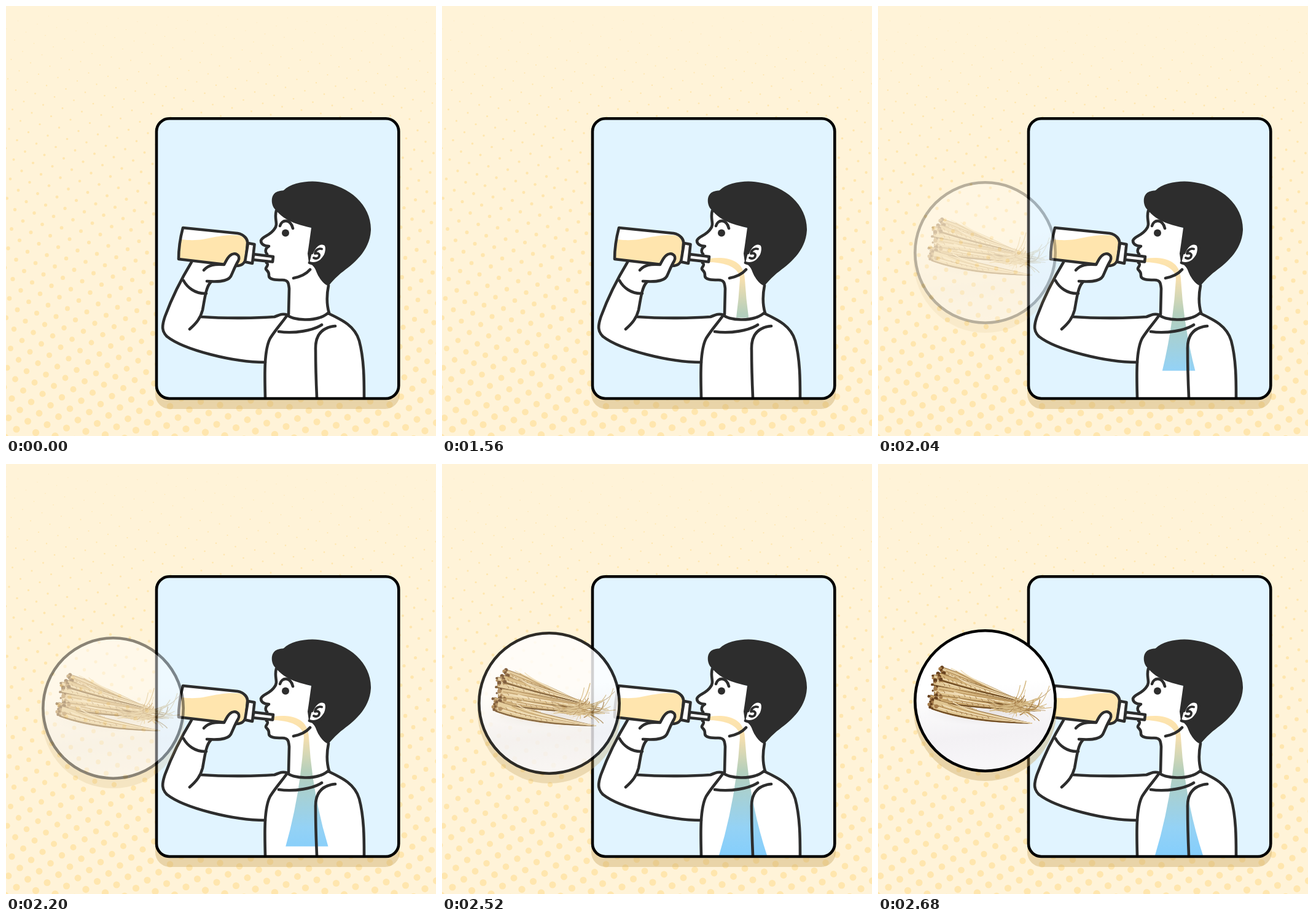
Write an HTML page that moves like this. It is 700 px wide and 700 px high and loops after 3.93 s.

```html
<!DOCTYPE html>
<html lang="en">
<head>
<meta charset="utf-8">
<title>Drink</title>
<style>
  html, body { margin: 0; width: 100%; height: 100%; overflow: hidden; background: #fff3d8; }
  svg { display: block; width: 100%; height: 100%; }
  .line { fill: none; stroke: #2d2d2d; stroke-width: 4.6; stroke-linecap: round; stroke-linejoin: round; }
  .skin { fill: #fff; }
  .ink { fill: #2d2d2d; }
  .rim { fill: none; stroke: #000; stroke-width: 4.6; }
</style>
</head>
<body>
<svg viewBox="0 0 700 700">
  <defs>
    <linearGradient id="flow" gradientUnits="userSpaceOnUse" x1="0" y1="410" x2="0" y2="637">
      <stop offset="0" stop-color="#ffe5ae"/>
      <stop offset=".15" stop-color="#f6dfae"/>
      <stop offset=".4" stop-color="#b4cfbc"/>
      <stop offset=".8" stop-color="#94d2f5"/>
      <stop offset="1" stop-color="#85cefc"/>
    </linearGradient>
    <linearGradient id="paper" x1=".4" y1="0" x2=".5" y2="1">
      <stop offset=".4" stop-color="#fff"/>
      <stop offset=".75" stop-color="#f3f1f4"/>
      <stop offset="1" stop-color="#f8f7f9"/>
    </linearGradient>
    <radialGradient id="shade">
      <stop offset="0" stop-color="#a99a92" stop-opacity=".25"/>
      <stop offset="1" stop-color="#c9c2c4" stop-opacity="0"/>
    </radialGradient>
    <clipPath id="wipe"><rect id="wipeBox" x="430" y="400" width="110" height="0"/></clipPath>
    <clipPath id="lens"><circle cx="174.5" cy="385.5" r="114"/></clipPath>
  </defs>

  <g id="dots" fill="#ffe6ae"></g>

  <rect x="243" y="197" width="398" height="459" rx="24" fill="#c8a55f" fill-opacity=".4"/>
  <rect x="245" y="183.300" width="394.300" height="455.700" rx="21" fill="#e1f4ff"/>

  <!-- body fills -->
  <g class="skin">
    <path d="M302 417C285 445 270 475 259 505C253 522 254 530 262 538C290 560 370 580 422 580L458 503C450 500 445 503 437 506C410 508 360 509 318 506C323 490 322 464 333 450L366 440 375 418Z"/>
    <path d="M440 333C436 348 444 354 437 363C430 374 417 375 415 382C415 388 421 391 428 391C421 395 422 401 425 404V418C429 422 423 424 423 428C424 431 428 431 428 438C427 446 440 446 450 446C460 446 460 452 461 460L459 503 490 520 526 500C523 490 521 475 525 455L530 380Z"/>
    <path d="M422 637C421 600 420 560 430 541C440 525 450 515 458 503C465 511 505 516 524 500C545 510 568 520 575 545C583 575 583 610 583 637Z"/>
  </g>

  <path clip-path="url(#wipe)" fill="url(#flow)" d="M436 411C460 408 492 411 493 445Q499 545 529 637H451Q479 545 485 445C485 430 470 418 436 417Z"/>

  <!-- head -->
  <path class="ink" d="M439 332C431 325 430 308 440 303C446 300 450 301 452 300C465 287 495 283 515 287C560 293 595 325 594 365C592 400 565 420 545 435C536 443 530 449 525 456C515 452 508 440 505 432C503 426 499 421 493 418L491 403C493 390 495 375 497 361C480 357 455 352 439 332Z"/>
  <path class="line" d="M440 333C436 348 444 354 437 363C430 374 417 375 415 382C415 388 421 391 428 391C421 395 422 401 425 404M424 418C429 422 423 424 423 428C424 431 428 431 428 438C427 446 440 446 450 446C460 446 460 452 461 460L460 502M525 455C521 475 523 490 526 500M468 443C478 441 489 436 495 429M446 358C449 347 463 346 467 362"/>
  <circle class="ink" cx="455" cy="369.500" r="6"/>
  <path class="line" style="fill:#fff" d="M498 402C502 391 510 384 518 387C525 390 522 404 517 410C511 419 501 421 494 418"/>
  <path class="line" style="stroke-width:3.800" d="M514 395.500C507 394 503 399 503 403C510 401 512 406 508 410C505 412 503 411 501 410"/>

  <!-- clothes and arm -->
  <path class="line" d="M422 637C421 600 420 560 430 541C440 525 450 515 458 503C465 511 505 516 524 500C545 510 568 520 575 545C583 575 583 610 583 637M444 530C470 534 500 528 514 519M536 521C515 523 503 535 504 560C504 590 505 615 506 637"/>
  <path class="line" d="M302 417C285 445 270 475 259 505C253 522 254 530 262 538C290 560 370 580 422 580M318 506C360 509 410 508 437 506C445 503 450 500 458 503M289 447C295 458 308 469 326 468M333 450C325 458 323 480 320 495C316 510 308 518 299 526"/>

  <!-- bottle and hand -->
  <path class="skin" d="M288 361L377 370C388 372 394 380 393 387L391 410C389 418 385 423 375 423L281 412C281 395 283 380 288 361Z"/>
  <path fill="#ffe5ae" d="M286 380C325 385 335 372 376 373C388 374 393 380 393 387L391 410C389 418 385 423 375 423L281 412C282 400 283 390 286 380Z"/>
  <path class="line" d="M288 361L377 370C388 372 394 380 393 387L391 410C389 418 385 423 375 423L281 412C281 395 283 380 288 361Z"/>
  <path class="line" style="fill:#fff" d="M394 386L404.500 388 401 419 389 416.500ZM403 404L435 408 434 416.500 402 413Z"/>
  <path class="skin" d="M327 448C340 449 360 450 366 440C370 432 372 425 378 415C383 405 372 400 365 406C360 410 358 416 355 421C340 420 330 421 322 430Z"/>
  <path class="line" d="M327 448C340 449 360 450 366 440C370 432 372 425 378 415C383 405 372 400 365 406C360 410 358 416 355 421C340 420 330 421 322 430"/>

  <rect class="rim" x="245" y="183.300" width="394.300" height="455.700" rx="21"/>

  <g id="photo" opacity="0">
    <circle cx="174.500" cy="399.500" r="116.500" fill="#c8a55f" fill-opacity=".4"/>
    <circle cx="174.500" cy="385.500" r="114" fill="url(#paper)"/>
    <g clip-path="url(#lens)">
      <ellipse cx="175" cy="406" rx="100" ry="20" fill="url(#shade)"/>
      <g id="roots" fill="none" stroke-linecap="round"></g>
    </g>
    <circle class="rim" cx="174.500" cy="385.500" r="114.200"/>
  </g>
</svg>
<script>
const $ = id => document.getElementById(id);
const noise = n => { const v = Math.sin(n * 127.1) * 43758.5453; return v - Math.floor(v); };

// Halftone: a tilted square lattice whose dots grow downwards
let dots = '';
for (let i = -30; i < 60; i++) {
  for (let j = -30; j < 60; j++) {
    const x = 20 + 18.5 * i + 13 * j, y = 300 - 13 * i + 18.5 * j;
    if (x < -8 || x > 708 || y < 15 || y > 708) continue;
    const r = 0.4 + 5.3 * (y / 700) ** 1.15;
    dots += `<circle cx="${x}" cy="${y}" r="${r.toFixed(2)}"/>`;
  }
}
$('dots').innerHTML = dots;

const curve = (x, y, cx, cy, ex, ey, color, width) =>
  `<path d="M${x} ${y}Q${cx} ${cy} ${ex} ${ey}" stroke="${color}" stroke-width="${width}"/>`;

// Tapered root: outline, grain lines along it, cross creases and a knotted crown
function root(x, y, cx, cy, ex, ey, w, color) {
  let s = `<path d="M${x} ${y - w}Q${cx} ${cy - w * 1.2} ${ex} ${ey}Q${cx} ${cy + w * 1.2} ${x} ${y + w}Z" fill="${color}" stroke="#8f6a3a"/>`;
  s += curve(x, y + w - 1, cx, cy + w, ex, ey, '#6f4b22', 2);
  for (let k = 0; k < 5; k++) {
    const d = w * (1.3 * noise(k + x + y) - 0.8);
    s += curve(x + 8 * k, y + d + 1, cx, cy + d, ex, ey, k % 2 ? '#b8925a' : '#f1dfba', 1.5);
  }
  for (let k = 0; k < 12; k++) {
    const p = k / 18, q = 1 - p, h = w * q * (noise(k + y) - 0.4);
    const px = q * q * x + 2 * p * q * cx + p * p * ex;
    const py = q * q * y + 2 * p * q * cy + p * p * ey + h;
    s += curve(px, py, px + 3, py + 1, px + 2, py + 3, '#9b7443', 0.9);
  }
  for (let k = 0; k < 5; k++) {
    const kx = x - 4 + 9 * noise(k + y), ky = y + w * (k / 2.5 - 0.8);
    s += `<circle cx="${kx}" cy="${ky}" r="${1.6 + 2 * noise(k + x)}" fill="${k % 2 ? '#a67d4b' : '#68421f'}"/>`;
  }
  return s;
}

let art = root(103, 336, 150, 352, 232, 386, 6, '#dcc08e')
  + root(91, 352, 160, 366, 258, 394, 9, '#e2c998')
  + root(100, 346, 158, 364, 244, 388, 6, '#d5b57c')
  + root(92, 369, 155, 380, 270, 396, 8, '#dcbf8a')
  + root(86, 387, 110, 396, 160, 400, 11, '#cda96e')
  + root(98, 382, 160, 392, 264, 402, 6, '#d0ae74')
  + root(90, 391, 150, 411, 250, 422, 9, '#e0c692');

// Fine rootlets spreading from the tails
for (let k = 0; k < 44; k++) {
  const x = 180 + 55 * noise(k), y = 382 + 20 * noise(k + 40) + (x - 180) / 6;
  const ex = 215 + 68 * noise(k + 80), ey = (k % 4 ? 378 : 350) + 40 * noise(k + 120);
  art += curve(x, y, (x + ex) / 2 + 12, 388 + 22 * noise(k + 160), ex, ey, k % 3 ? '#d6bb87' : '#ac854f', 0.7 + 1.1 * noise(k + 9));
}
$('roots').innerHTML = art;

const LOOP = 3930, START = 1080, STEP = 80, LAST = 20;

function draw() {
  const t = performance.now() % LOOP;
  const n = Math.min(LAST, Math.floor((t - START) / STEP));
  const left = LAST - n;
  $('wipeBox').setAttribute('height', n < 0 ? 0 : Math.min(237, 21 + 14.4 * n));
  $('photo').setAttribute('opacity', Math.max(0, 1 - left / 11));
  $('photo').setAttribute('transform', `translate(0 ${2 * left})`);
  requestAnimationFrame(draw);
}
draw();
</script>
</body>
</html>
```
